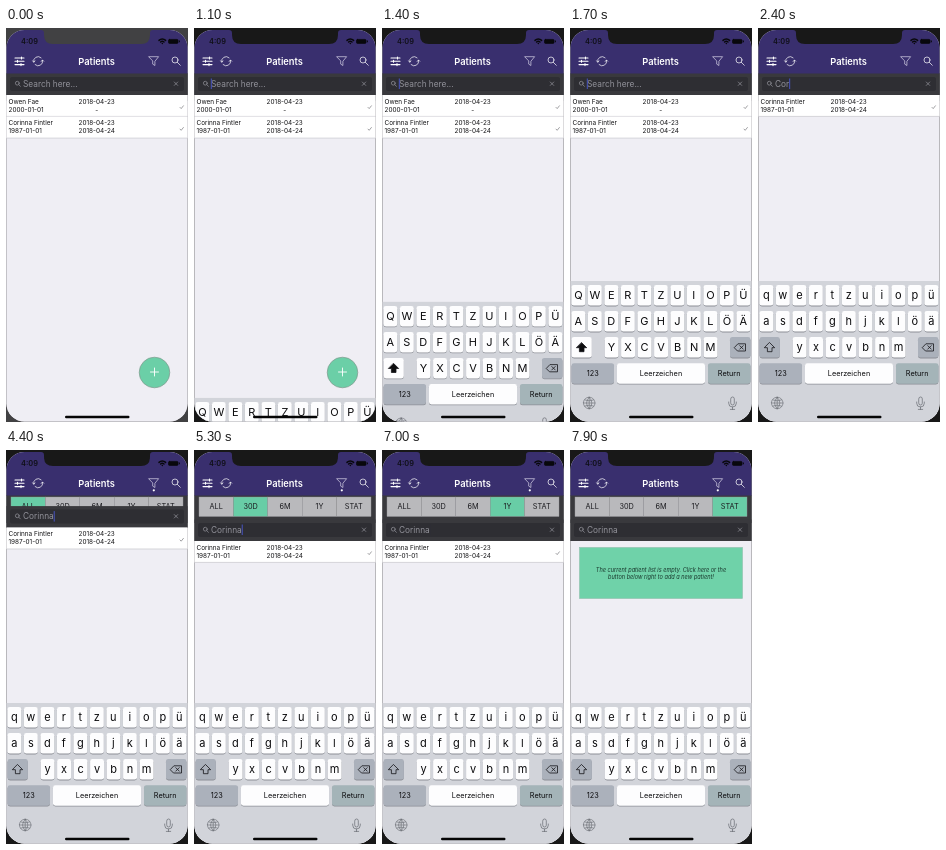
These frames come from a looping animation (182 px wide and 394 px high, 8 s). An HTML page:

```html
<!DOCTYPE html>
<html lang="en">
<head>
<meta charset="utf-8">
<title>Patients</title>
<style>
  html, body { margin: 0; width: 100%; height: 100%; overflow: hidden; background: #181818; }
  svg { display: block; width: 182px; height: 394px; font-family: Inter, Roboto, sans-serif; }
  .line { stroke-linecap: round; stroke-linejoin: round; }
</style>
</head>
<body>
<svg id="stage" viewBox="0 0 182 394">
  <clipPath id="screen"><rect x=".5" y="2" width="181" height="391.5" rx="18"/></clipPath>
  <rect id="bezel" width="182" height="394"/>
  <g clip-path="url(#screen)">
    <rect width="182" height="394" fill="#efeef4"/>
    <rect y="45" width="182" height="28" fill="#39393d"/>
    <g id="segments"></g>
    <g id="content">
      <rect y="67" width="182" height="327" fill="#efeef4"/>
      <rect y="45.5" width="182" height="21.5" fill="#39393d"/>
      <rect x="4" y="49" width="174" height="14" rx="2" fill="#2e2e33"/>
      <g class="line" fill="none" stroke="#8b8b92" stroke-width=".8">
        <circle cx="11.3" cy="55.2" r="1.9"/><path d="M12.8 56.7l1.6 1.6M168.3 54l3.4 3.4m0-3.4l-3.4 3.4"/>
      </g>
      <text id="query" x="17" y="58.5" font-size="8.3" fill="#92929a"></text>
      <rect id="caret" y="50.5" width="1" height="10.5" fill="#4754c0"/>
      <g id="rows"></g>
      <g id="empty" text-anchor="middle" font-size="5.6" font-style="italic" fill="#17352a">
        <rect x="9.5" y="73.5" width="163" height="51" fill="#6fd2a9" stroke="#8fbfac" stroke-width=".6"/>
        <text x="91" y="98">The current patient list is empty. Click here or the</text>
        <text x="91" y="105">button below right to add a new patient!</text>
      </g>
    </g>
    <rect width="182" height="45.5" fill="#392f6e"/>
    <text x="90.6" y="37.2" font-size="9.3" font-weight="600" fill="#fff" text-anchor="middle">Patients</text>
    <g class="line" fill="none" stroke="#fff" stroke-width=".7">
      <path d="M9 30h9M9 33.3h9M9 36.6h9M15.5 29v2M11.5 32.3v2M15 35.6v2" stroke-width="1.1"/>
      <path d="M27.7 34a4.5 4.5 0 0 1 7.4-4.2M36.5 32.2a4.5 4.5 0 0 1-7.4 4.4M26.6 32.8l1.1 1.4 1.3-1.2M35.2 33.4l1.3-1.4 1.2 1.2"/>
      <path d="M143 28.7h9.6l-3.7 4.6v4.2l-2.2-1.4v-2.8z" stroke="#d8d5e8"/>
      <circle cx="169" cy="32" r="3"/><path d="M171.3 34.3l3 3"/>
    </g>
    <circle id="dot" cx="147.8" cy="40.3" r="1.1" fill="#fff"/>
    <text x="15" y="16.2" font-size="7.4" font-weight="600" fill="#101018">4:09</text>
    <g class="line" fill="none" stroke="#08080c">
      <path d="M153 12.4a4.8 4.8 0 0 1 6.6 0M154.6 14a2.6 2.6 0 0 1 3.4 0M156.3 15.6h.1" stroke-width="1.5"/>
      <rect x="162.5" y="11.4" width="9.5" height="4" rx="1" fill="#08080c" stroke-width=".7"/>
      <path d="M173.4 12.9v1"/>
    </g>
    <circle cx="148.5" cy="344.5" r="15.3" fill="#6bcfa7" stroke="#83998f" stroke-width=".7"/>
    <path d="M144.5 344h8m-4-4v8" class="line" stroke="#fff" stroke-width=".9"/>
    <g id="keyboard" text-anchor="middle" fill="#0c0c0e">
      <rect y="253" width="182" height="150" fill="#d2d4da"/>
    </g>
    <rect x="59" y="387.8" width="64.5" height="2.4" rx="1.2" fill="#050505"/>
  </g>
  <path id="notch" d="M35 0v2q3 0 3 3v2q0 9 9 9h88q9 0 9-9v-2q0-3 3-3v-2z"/>
</svg>
<script>
const LOOP = 8000;
const NAME = 'Corinna';
const GREEN = '#68cda6', GRAY_KEY = '#abb1bb';
const $ = id => document.getElementById(id);

function add(parent, tag, attrs, text = '') {
  const el = document.createElementNS('http://www.w3.org/2000/svg', tag);
  for (const key in attrs) el.setAttribute(key, attrs[key]);
  el.textContent = text;
  return parent.appendChild(el);
}
const show = (el, on) => el.setAttribute('opacity', +on);
const shift = (el, y) => el.setAttribute('transform', `translate(0 ${y})`);
const clamp = v => Math.min(1, Math.max(0, v));
const progress = (t, start, length) => clamp((t - start) / length);

// Filter segments
const segments = ['ALL', '30D', '6M', '1Y', 'STAT'].map((label, i) => {
  const x = 5 + i * 34.4;
  const box = add($('segments'), 'rect', { x, y: 47, width: 34.4, height: 19.5, stroke: '#98989c', 'stroke-width': .4 });
  add($('segments'), 'text', { x: x + 17.2, y: 59.4, 'font-size': 7.3, 'text-anchor': 'middle', fill: '#1c1c20' }, label);
  return box;
});

// Patient rows
function patientRow(name, born, first, last) {
  const row = add($('rows'), 'g', { 'font-size': 6.4, fill: '#141416' });
  add(row, 'rect', { y: 67, width: 182, height: 21.5, fill: '#fff' });
  add(row, 'path', { d: 'M0 88.4h182', stroke: '#bdbdc3', 'stroke-width': .6 });
  add(row, 'text', { x: 2.5, y: 75.7 }, name);
  add(row, 'text', { x: 2.5, y: 83.8 }, born);
  add(row, 'text', { x: 90.7, y: 75.7, 'text-anchor': 'middle' }, first);
  add(row, 'text', { x: 90.7, y: 83.8, 'text-anchor': 'middle' }, last);
  add(row, 'path', { d: 'M174 79.4l1.2 1.2 2.2-2.8', class: 'line', fill: 'none', stroke: '#77777c', 'stroke-width': .7 });
  return row;
}
const otherRow = patientRow('Owen Fae', '2000-01-01', '2018-04-23', '-');
const matchRow = patientRow(NAME + ' Fintler', '1987-01-01', '2018-04-23', '2018-04-24');

// Keyboard
const keyboard = $('keyboard');
function key(x, y, width, fill, label = '', size = 7.3) {
  add(keyboard, 'rect', { x, y: y + .8, width, height: 20.5, rx: 2.4, fill: '#8d9097' });
  const box = add(keyboard, 'rect', { x, y, width, height: 20.5, rx: 2.4, fill });
  const text = add(keyboard, 'text', { x: x + width / 2, y: y + 10.2 + size * .36, 'font-size': size }, label);
  return { box, text, label };
}
const letters = [['QWERTZUIOPÜ', 1.4], ['ASDFGHJKLÖÄ', 1.4], ['YXCVBNM', 34.6]].flatMap(([row, x], r) =>
  [...row].map((c, i) => key(x + i * 16.5, 257.1 + r * 26, 13.9, '#fdfdfe', c, 11)));
const shiftKey = key(1.6, 309.1, 20.2, '#fdfdfe');
key(160, 309.1, 20.4, GRAY_KEY);
key(1.6, 335.2, 42.4, GRAY_KEY, '123');
key(47, 335.2, 88, '#fdfdfe', 'Leerzeichen');
key(138, 335.2, 42.4, '#a4b4b8', 'Return');
const glyph = (d, attrs) => add(keyboard, 'path', { d, class: 'line', fill: 'none', stroke: '#16161a', 'stroke-width': .8, ...attrs });
const arrow = glyph('M11.7 314.7l5 5h-2.7v4h-4.6v-4h-2.7z');
glyph('M164.5 319.4l3.4-3.6h7.6v7.2h-7.6zM169.8 317.7l3.4 3.4m0-3.4l-3.4 3.4');
glyph('M13.4 375a5.8 5.8 0 1 0 11.6 0a5.8 5.8 0 1 0-11.6 0h11.6M19.2 369.2v11.6M19.2 369.2q-5.4 5.8 0 11.6q5.4-5.8 0-11.6M14.8 372q4.4 1.8 8.8 0M14.8 378q4.4-1.8 8.8 0',
  { stroke: '#666970', 'stroke-width': .6 });
glyph('M160.7 370.8a1.8 1.8 0 0 1 3.6 0v4.4a1.8 1.8 0 0 1-3.6 0zM158.7 374v1.2a3.8 3.8 0 0 0 7.6 0V374M162.5 379v2.4M160.3 381.4h4.4',
  { stroke: '#666970', 'stroke-width': .7 });

function caretOpacity(t) {
  if (t < 1100) return 0;
  if (t < 3400) return 1;
  const phase = t % 1000;
  return phase < 500 ? progress(phase, 0, 100) : 1 - progress(phase, 600, 150);
}

function draw(t) {
  const bezel = t >= 1100 ? '#181818' : '#414143';
  $('bezel').setAttribute('fill', bezel);
  $('notch').setAttribute('fill', bezel);

  shift(keyboard, 141 * (1 - progress(t, 1050, 570)) ** 2);

  const typed = t < 2000 ? 0 : Math.min(NAME.length, Math.floor((t - 2000) / 200) + 1);
  const query = $('query');
  query.textContent = typed ? NAME.slice(0, typed) : 'Search here...';
  $('caret').setAttribute('x', typed ? 17 + query.getComputedTextLength() : 16.8);
  show($('caret'), caretOpacity(t));

  for (const k of letters) k.text.textContent = typed ? k.label.toLowerCase() : k.label;
  shiftKey.box.setAttribute('fill', typed ? GRAY_KEY : '#fdfdfe');
  arrow.setAttribute('fill', typed ? 'none' : '#0c0c0e');

  const open = progress(t, 4300, 400);
  shift($('content'), 24 * open * (2 - open));
  show($('segments'), t >= 4300);
  show($('dot'), t >= 4300);

  const selected = [5200, 5800, 6500, 7200].filter(start => t >= start).length;
  segments.forEach((box, i) => box.setAttribute('fill', i === selected ? GREEN : '#b9b9bc'));

  const empty = selected === 4;
  show($('empty'), empty);
  show(matchRow, !empty);
  show(otherRow, !typed);
  shift(matchRow, typed ? 0 : 21.7);
}

const start = performance.now();
function tick() {
  draw((performance.now() - start) % LOOP);
  requestAnimationFrame(tick);
}
tick();
</script>
</body>
</html>
```
